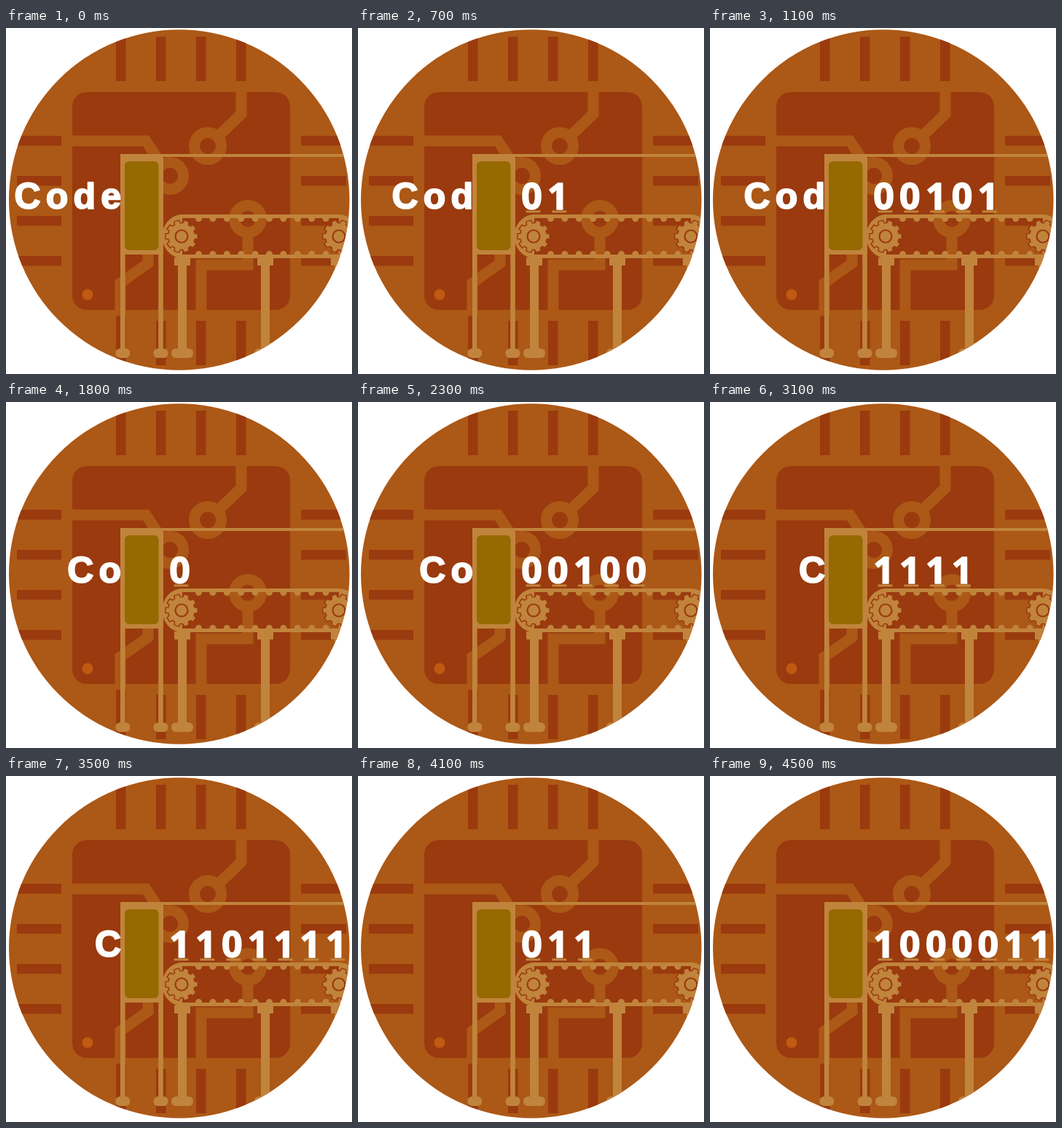
These frames come from a looping animation (475 by 475 pixels, 4.9 s). An HTML page:

```html
<!DOCTYPE html>
<html lang="en">
<head>
<meta charset="utf-8">
<title>Code to bits</title>
<style>
  html, body { margin: 0; width: 100%; height: 100%; overflow: hidden; background: #fff; }
  svg { display: block; width: 100vw; height: 100vh; }
  text { fill: #fff; stroke: #fff; stroke-linejoin: round; font-kerning: none; }
  #word {
    font: bold 50px "Liberation Sans", Arial, sans-serif;
    stroke-width: 2; text-anchor: end; letter-spacing: 7.2px;
  }
  #bits { font: bold 50px "Open Sans", sans-serif; stroke-width: 1.6; }
  .board { fill: #ac5816; }
  .chip { fill: #9a3a0e; }
  .tan { fill: #c0843c; }
  .trace { fill: none; stroke: #ac5816; stroke-width: 15; }
  .line { fill: none; stroke: #c0843c; stroke-width: 5; }
  .cogs { stroke-width: 9; stroke-linecap: round; stroke-dasharray: 0 19.4; }
</style>
</head>
<body>
<svg viewBox="0 0 475 475">
  <clipPath id="disc"><circle cx="237.8" cy="236" r="233.8"/></clipPath>
  <g clip-path="url(#disc)">
    <rect class="board" width="475" height="475"/>
    <g id="pins" class="chip"></g>
    <rect class="chip" x="91" y="88" width="299" height="299" rx="20"/>
    <path class="trace" d="M88 155H192L214 188M323 86V118L291 149M332 282V325H268V390M195 300V323L157 350V390"/>
    <path class="chip" d="M151 395h13.500v8h-13.500z"/>
    <g id="rings" class="chip" stroke="#ac5816" stroke-width="15"></g>
    <circle cx="112" cy="366" r="7.5" fill="#c05a12"/>

    <g id="frame" class="tan"></g>
    <rect x="163" y="183" width="46.500" height="122" rx="6" fill="#966a00"/>

    <path class="tan" d="M242 256A27.500 30 0 0 0 242 316ZM457 256A27.500 30 0 0 1 457 316Z"/>
    <path class="line" d="M242 258.500H457M242 313.500H457"/>
    <path class="line cogs" d="M264.500 261.500H440M264.500 310.500H440"/>
    <g id="gears" class="tan" stroke="#9a3a0e" stroke-width="1.500"></g>

    <path id="dashes" stroke="#c0843c" stroke-width="3"/>
    <text id="word" x="165.200" y="248"></text>
    <text id="bits" y="248.500"></text>
  </g>
</svg>
<script>
const $ = id => document.getElementById(id);
const rect = (x, y, w, h, r = 0) =>
  `<rect x="${x}" y="${y}" width="${w}" height="${h}" rx="${r}"/>`;
const circle = (x, y, r, more = '') => `<circle cx="${x}" cy="${y}" r="${r}" ${more}/>`;

for (let i = 0; i < 4; i++) {
  const along = 55 * i;
  $('pins').innerHTML +=
    rect(151 + along, 12, 13.5, 61) + rect(151 + along, 402, 13.5, 61) +
    rect(15, 148 + along, 61, 13.5) + rect(405, 148 + along, 62, 13.5);
}

$('rings').innerHTML = [[225, 203], [277, 162], [332, 262]]
  .map(([x, y]) => circle(x, y, 18.5)).join('');

const leg = x => rect(x - 11, 315, 22, 11) + rect(x - 6, 320, 12, 124) + rect(x - 15, 440, 30, 13, 6);
const post = x => rect(x - 3.3, 173, 6.6, 270) + rect(x - 10, 440, 20, 13, 6);
$('frame').innerHTML =
  rect(157, 173, 320, 4) + rect(157, 173, 59, 138, 2) +
  post(160.3) + post(212.5) + [242, 356, 457].map(leg).join('');

function gear(cx, cy) {
  const teeth = 10, pts = [];
  for (let i = 0; i < teeth; i++) {
    for (const [shift, r] of [[-.35, 18.5], [-.24, 22.5], [.24, 22.5], [.35, 18.5]]) {
      const a = (i + shift) / teeth * 2 * Math.PI;
      pts.push((cx + r * Math.cos(a)).toFixed(1) + ',' + (cy + r * Math.sin(a)).toFixed(1));
    }
  }
  return `<polygon points="${pts.join(' ')}"/>` + circle(cx, cy, 8.5, 'stroke-width="2.2"');
}
$('gears').innerHTML = gear(241, 286) + gear(457, 286);

// Each letter, last one first, leaves the machine as seven bits, lowest bit first.
const word = 'Code', loop = 4900, pitch = 35.8;
const ticks = [
  600, 700, 800, 1000, 1100, 1300, 1400,
  1800, 1900, 2000, 2100, 2300, 2400, 2400,
  2700, 2900, 3000, 3100, 3200, 3300, 3500,
  3800, 3900, 4100, 4200, 4300, 4400, 4500
];
let shown = -1;

function draw(now) {
  const t = now % loop;
  const n = ticks.filter(tick => tick <= t).length;
  if (n !== shown) {
    shown = n;
    const left = word.length - Math.ceil(n / 7);
    const count = n ? (n - 1) % 7 + 1 : 0;
    const bits = n ? word.charCodeAt(left).toString(2).slice(-count) : '';
    const slots = [...bits].map((_, i) => pitch * i);
    $('word').textContent = word.slice(0, left);
    $('bits').textContent = bits;
    $('bits').setAttribute('x', slots.map(x => 224.3 + x).join(' '));
    $('dashes').setAttribute('d', slots.map(x => `M${230.5 + x} 252h20`).join(''));
  }
  requestAnimationFrame(draw);
}
draw(performance.now());
</script>
</body>
</html>
```
